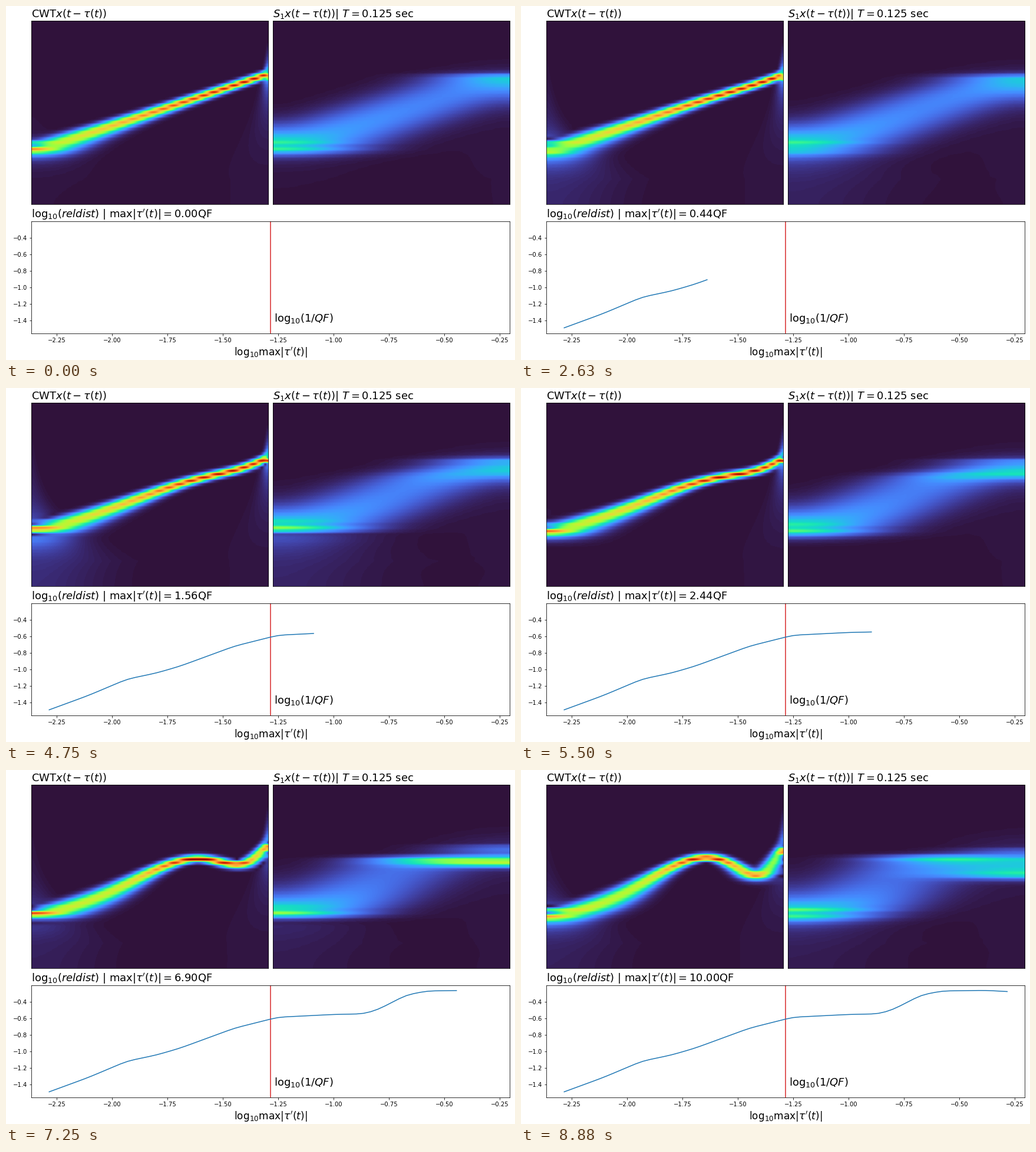
Recreate the animation shown at these times as a matplotlib script. Size 864 by 600 pixels, loop 9010 ms.

```python
import numpy as np
import matplotlib.pyplot as plt
from matplotlib.animation import FuncAnimation
from matplotlib.ticker import MultipleLocator

W, H, DPI = 864, 600, 72
FRAMES, INTERVAL = 106, 85         # one loop of 9010 ms
STEP_MS, LAST_STEP, SWEEP = 125, 71, 63
N = 1024                           # samples in one second
Q, XI_MAX = 8, 2048 / (1 + 2 ** (3 / 8))
F_LO, F_HI = 30.0, 231.0           # chirp range in Hz
T = 0.125

plt.rcParams.update({"font.family": "DejaVu Sans", "mathtext.fontset": "dejavusans"})

# Wavelet filterbank: geometric rows, then linear rows of constant bandwidth
ratio = 2 ** (-1 / Q)
rel_sigma = (1 - ratio) / (1 + ratio) / np.sqrt(np.log(2))
xi = XI_MAX * ratio ** np.arange(48)
xi = np.append(xi, xi[-1] * np.arange(Q - 1, 0, -1) / Q)
sigma = rel_sigma * np.maximum(xi, xi[47])
freqs = np.fft.fftfreq(2 * N, 1 / N)
psi = 2 * np.exp(-0.5 * ((freqs - xi[:, None]) / sigma[:, None]) ** 2)
phi = np.exp(-0.5 * (freqs * T / 0.1) ** 2)

# Slope of the time warp: a growing, quickening oscillation
t = np.arange(N) / N
warp = 1.05 * np.exp(2.1 * (t - 0.9)) * np.sin(np.pi * (0.21 + 1.735 * t + 0.98 * t ** 2))

# Relative distance against warp strength, both as log10
log_qf = np.log10(1 / rel_sigma)
sweep = np.linspace(-1, 1, SWEEP)
keys = np.array([(-1, -1.489), (-.822, -1.314), (-.649, -1.118), (-.516, -1.043),
                 (-.41, -.961), (-.163, -.718), (.033, -.586), (.288, -.552),
                 (.418, -.545), (.482, -.496), (.612, -.318), (.705, -.268),
                 (.904, -.261), (1, -.275)])
dist = np.interp(sweep, *keys.T)
dist[1:-1] = (dist[:-2] + 2 * dist[1:-1] + dist[2:]) / 4


def strength(step):
    return 10 ** sweep[min(step, SWEEP) - 1] if step else 0.0


def transforms(m):
    f = F_LO * (F_HI / F_LO) ** t * (1 - m * rel_sigma * warp)
    start = -np.radians(440) * (1 - np.exp(-m / 5))
    phase = start + 2 * np.pi * (np.cumsum(f) - f[0]) / N
    # settle on a steady phase at the right edge
    gap = np.radians(25) - phase[-1]
    phase += ((gap + np.pi / 2) % np.pi - np.pi / 2) * t ** 3
    x = np.cos(phase)
    spec = np.fft.fft(np.concatenate([x, x[::-1]]))
    cwt = np.abs(np.fft.ifft(spec * psi))
    scat = np.fft.ifft(np.fft.fft(cwt) * phi).real
    return cwt[:, :N:2], scat[:, :N:2]


fig = plt.figure(figsize=(W / DPI, H / DPI), dpi=DPI, facecolor="white")


def panel(x0, y0, x1, y1):
    return fig.add_axes([x0 / W, 1 - y1 / H, (x1 - x0) / W, (y1 - y0) / H])


def heatmap(x0, vmax, title):
    ax = panel(x0, 25, x0 + 402.06, 336)
    ax.set(xticks=[], yticks=[])
    ax.set_title(title, loc="left", fontsize=18)
    return ax.imshow(np.zeros((len(xi), N // 2)), cmap="turbo", vmin=0, vmax=vmax,
                     aspect="auto", interpolation="hanning")


cwt_im = heatmap(43.2, 1.0, r"CWT$x(t - \tau(t))$")
scat_im = heatmap(453.3, 0.95, r"$S_1x(t - \tau(t))|\ T=0.125$ sec")

ax = panel(43.2, 365, 855.36, 555)
ax.set(xlim=(-1.08 - log_qf, 1.08 - log_qf), ylim=(-1.557, -0.2))
ax.xaxis.set_major_locator(MultipleLocator(0.25))
ax.set_yticks(np.linspace(-1.4, -0.4, 6))
ax.set_xlabel(r"log$_{10}$max$|\tau'(t)|$", fontsize=17)
ax.axvline(-log_qf, color="tab:red")
ax.text(-1.27, -1.415, r"log$_{10}(1/QF)$", fontsize=18)
line, = ax.plot([], [], color="tab:blue")
title = ax.set_title("", loc="left", fontsize=18)


def update(n):
    step = min(((n + 1) * INTERVAL - 1) // STEP_MS, LAST_STEP)
    m = strength(step)
    cwt, scat = transforms(m)
    cwt_im.set_data(cwt)
    scat_im.set_data(scat)
    line.set_data(sweep[:step] - log_qf, dist[:step])
    title.set_text(rf"log$_{{10}}(reldist)$ | max$|\tau'(t)|={m:.2f}$QF")
    return cwt_im, scat_im, line, title


anim = FuncAnimation(fig, update, frames=FRAMES, interval=INTERVAL,
                     repeat=True, repeat_delay=0, blit=False)
plt.show()
```
